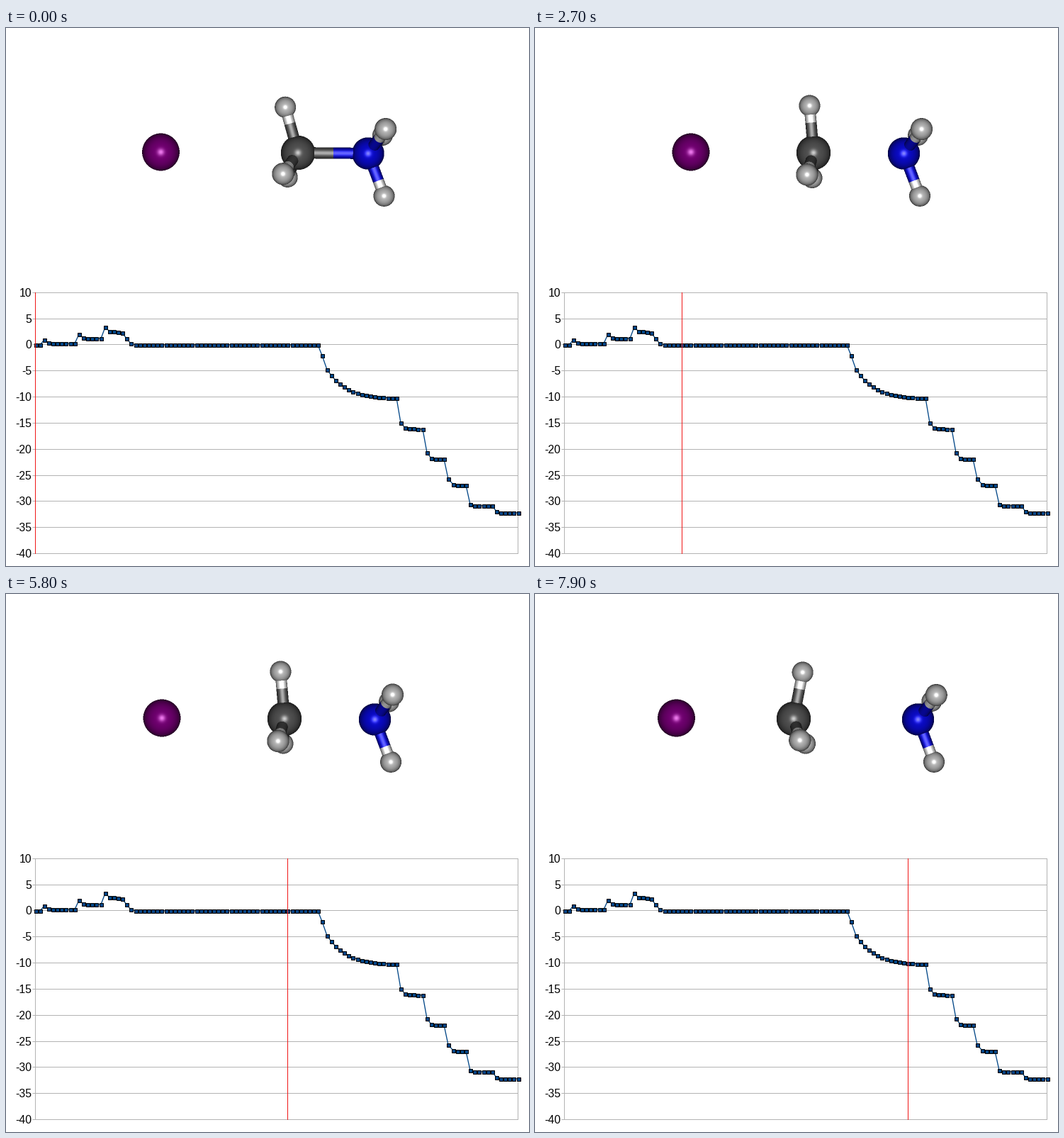
A matplotlib script for the animation above (8000 ms loop, 738 by 759 pixels).

```python
import numpy as np
import matplotlib.pyplot as plt
from matplotlib.animation import FuncAnimation

W, H, DPI = 738, 759, 64
PX = 72 / DPI
FRAMES, INTERVAL = 80, 100


def logistic(x):
    return 1 / (1 + np.exp(-x))


# ---- energy curve ---------------------------------------------------------
LEFT, RIGHT, TOP, BOTTOM = 41.5, 722.6, 373.2, 741.6
LAST = 111

# Each relaxation: first step, energy after the hop, settled energy
STAGES = [(0, 0, 0), (2, 1, .3), (10, 2, 1.2), (16, .9, 0),
          (66, -2.1, -2.1), (67, -4.75, -10.4), (84, -14.9, -16.1),
          (90, -20.6, -21.85), (95, -25.7, -26.95),
          (100, -30.6, -30.85), (106, -31.9, -32.15)]


def energy(i):
    first, peak, level = [s for s in STAGES if s[0] <= i][-1]
    rate = .8 if first == 67 else .12
    barrier = 2.5 * logistic(2.1 * (21 - i)) if first == 16 else 0
    return level + (peak - level) * rate ** (i - first) + barrier


def chart_x(i):
    return LEFT + (RIGHT - LEFT) * i / LAST


def chart_y(v):
    return TOP + (10 - v) * (BOTTOM - TOP) / 50


def pixel(v):
    return np.floor(v) + .5


# ---- molecule -------------------------------------------------------------
IODINE, CARBON, NITRO, HYDRO = (
    np.array(c, float) for c in
    ((116, 0, 116), (84, 84, 84), (10, 10, 205), (184, 184, 184)))
COLORS = [IODINE, CARBON, NITRO] + [HYDRO] * 6
RADIUS = np.array([26.4, 24.2, 22.7] + [15] * 6)
BONDS = [(1, 3), (1, 4), (1, 5), (2, 6), (2, 7), (2, 8)]

# x of I, C and N: apart, pushed, close, transition, separated
PATH = np.array([(218.5, 412, 511), (228, 408, 510), (233, 406, 510),
                 (220, 393, 520.5), (199.5, 365, 540.5)])


def progress(k):
    hops = .45 * (k >= 2) + .55 * (k >= 10) + (k >= 16)
    return hops + logistic(1.2 * (k - 20.5)) * (k >= 16) \
        + np.clip((k - 65) / 14, 0, 1)


def tripod(center, lean, length, spin):
    """Three hydrogens spread evenly around the x axis."""
    rho = np.sqrt(length ** 2 - lean ** 2)
    return [center + (lean, -rho * np.cos(a), rho * np.sin(a))
            for a in spin + np.arange(3) * 2 * np.pi / 3]


def project(p):
    """Mild perspective with a slight pitch; z points to the viewer."""
    x, y, z = p.T
    return np.column_stack([x + (x - 475) * z / 1400,
                            y - .062 * z + (y - 181) * z / 1400, z])


def atoms_at(k):
    s = progress(k)
    xs = [np.interp(s, range(len(PATH)), track) for track in PATH.T]
    heavy = [np.array([x, y, 0]) for x, y in zip(xs, (175, 176, 177))]
    umbrella = -.65 * (xs[1] - 384.5)
    twist = .02 * np.sin(np.pi * np.clip((k - 40) / 22, 0, 1))
    points = (heavy + tripod(heavy[1], umbrella, 66.7, twist)
              + tripod(heavy[2], 22.5, 64, np.pi - twist))
    return project(np.array(points))


# ---- z-buffered renderer --------------------------------------------------
X0, X1, Y0, Y1, SS = 150, 610, 80, 265, 2
gx, gy = np.meshgrid(X0 + (np.arange((X1 - X0) * SS) + .5) / SS,
                     Y0 + (np.arange((Y1 - Y0) * SS) + .5) / SS)


class Scene:
    def __init__(self):
        self.rgb = np.full(gx.shape + (3,), 255.0)
        self.z = np.full(gx.shape, -1e9)

    def window(self, lo, hi):
        x, y = ((lo - (X0, Y0)) * SS).astype(int)
        u, v = ((hi - (X0, Y0)) * SS).astype(int)
        return slice(max(y, 0), v + 1), slice(max(x, 0), u + 1)

    def put(self, win, hit, z, nz, color, shine, gloss):
        hit = hit & (z > self.z[win])
        nz = np.clip(nz, 0, 1)[..., None]
        lit = color * (.15 + .85 * nz) + 255 * shine * nz ** gloss
        self.rgb[win][hit] = np.clip(lit, 0, 255)[hit]
        self.z[win][hit] = z[hit]

    def sphere(self, c, r, color):
        win = self.window(c[:2] - r - 1, c[:2] + r + 1)
        d2 = (gx[win] - c[0]) ** 2 + (gy[win] - c[1]) ** 2
        h = np.sqrt(np.maximum(r * r - d2, 0))
        self.put(win, d2 < r * r, c[2] + h, h / r, color, .48, 60)

    def bond(self, a, b, ca, cb, split, r=8):
        length = np.linalg.norm(b - a)
        ux, uy, uz = (b - a) / length
        win = self.window(np.minimum(a, b)[:2] - r, np.maximum(a, b)[:2] + r)
        wx, wy, wz = gx[win] - a[0], gy[win] - a[1], -a[2]
        along = wx * ux + wy * uy + wz * uz
        qa = 1 - uz * uz
        qb = wz - along * uz
        qc = wx ** 2 + wy ** 2 + wz ** 2 - along ** 2 - r * r
        disc = qb * qb - qa * qc
        t = (-qb + np.sqrt(np.maximum(disc, 0))) / qa
        s = along + t * uz
        hit = (disc > 0) & (s > 0) & (s < length)
        color = np.where((s < split * length)[..., None], ca, cb)
        self.put(win, hit, t, (wz + t - s * uz) / r, color, .36, 12)


def render(k):
    atoms = atoms_at(k)
    scene = Scene()
    for a, b in BONDS:
        scene.bond(atoms[a], atoms[b], COLORS[a], HYDRO * 1.15, .64)
    if atoms[2, 0] - atoms[1, 0] < 118:
        scene.bond(atoms[1], atoms[2], CARBON, NITRO, .505)
    for c, r, color in zip(atoms, RADIUS, COLORS):
        scene.sphere(c, r * (1 + c[2] / 1400), color)
    h, w = gx.shape
    small = scene.rgb.reshape(h // SS, SS, w // SS, SS, 3).mean(axis=(1, 3))
    return np.round(small).astype(np.uint8)


# ---- figure ---------------------------------------------------------------
fig = plt.figure(figsize=(W / DPI, H / DPI), dpi=DPI, facecolor="white")
ax = fig.add_axes([0, 0, 1, 1])
ax.axis("off")
picture = ax.imshow(render(0), extent=(X0, X1, Y1, Y0),
                    interpolation="nearest", aspect="auto", zorder=0)
ax.set_xlim(0, W)
ax.set_ylim(H, 0)


def rule(xs, ys, color, z):
    line, = ax.plot(xs, ys, color=color, lw=PX, zorder=z, snap=False,
                    solid_capstyle="butt")
    return line


GREY = "#b3b3b3"
span = [pixel(TOP) - .5, pixel(BOTTOM) + .5]
for v in range(10, -41, -5):
    y = pixel(chart_y(v))
    rule([LEFT - 4, RIGHT], [y, y], GREY, 1)
    ax.text(36, y - .5, str(v), family="Liberation Sans", size=15.7 * PX,
            ha="right", va="center_baseline", color="black")
for x in (LEFT, RIGHT):
    rule([pixel(x)] * 2, span, GREY, 1)

steps = np.arange(LAST + 1)
heights = np.array([energy(i) for i in steps])
ax.plot(np.round(chart_x(steps)), np.round(chart_y(heights)),
        color="#004586", lw=1.3 * PX, marker="s", ms=5 * PX, mec="black",
        mew=PX, snap=False, zorder=2)
cursor = rule([pixel(LEFT)] * 2, span, "#f01818", 3)


def update(k):
    picture.set_data(render(k))
    cursor.set_xdata([pixel(chart_x(k))] * 2)
    return picture, cursor


anim = FuncAnimation(fig, update, frames=FRAMES, interval=INTERVAL,
                     repeat=True, repeat_delay=0)
plt.show()
```
